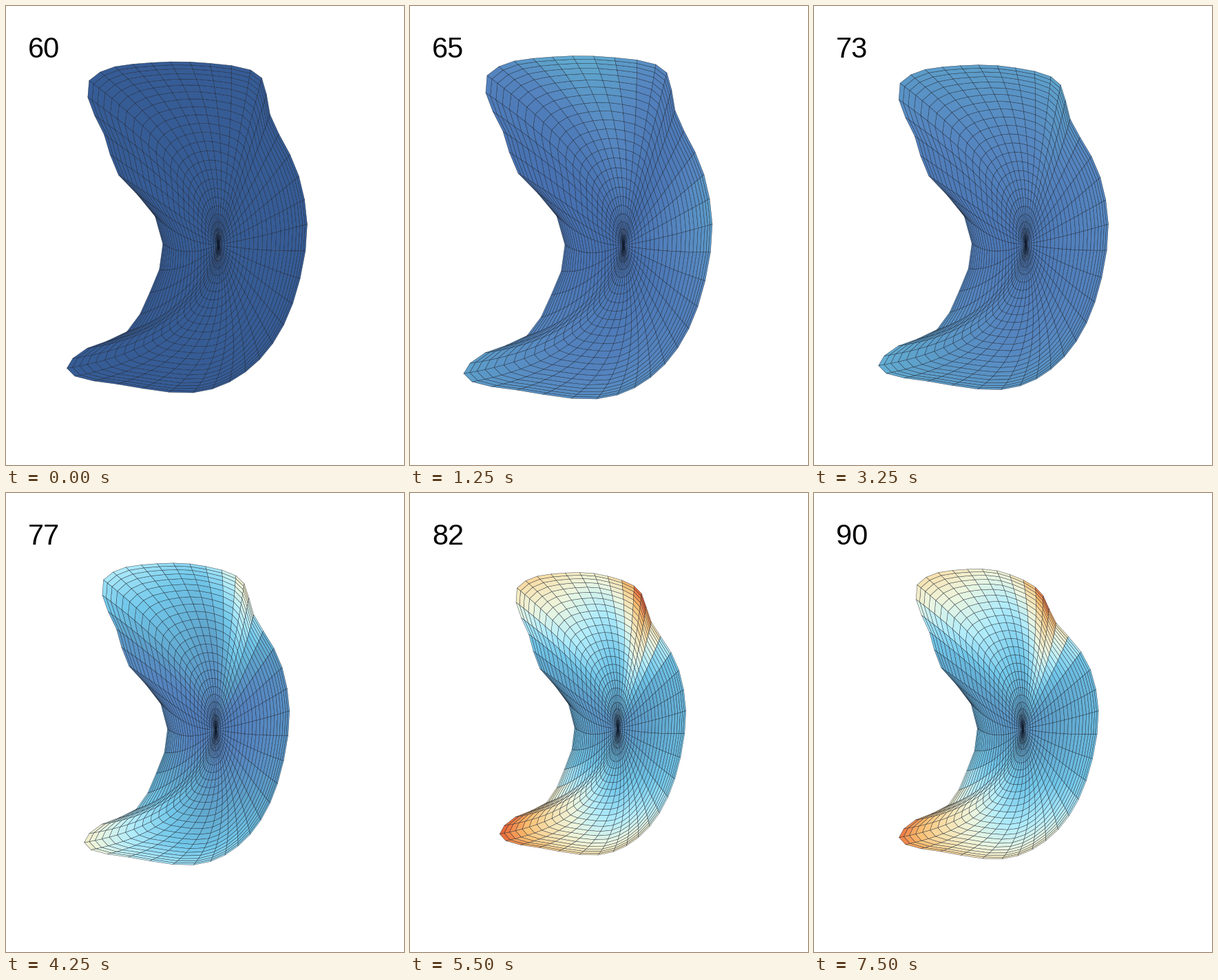
A matplotlib script for the animation above (7750 ms loop, 578 by 667 pixels).

```python
import numpy as np
import matplotlib.pyplot as plt
from matplotlib.animation import FuncAnimation
from matplotlib.collections import PolyCollection
from matplotlib.colors import LinearSegmentedColormap

W, H, DPI = 578, 667, 100
FIRST, LAST = 60, 90
RINGS, SPOKES = 25, 49

CMAP = LinearSegmentedColormap.from_list("strain", [
    "#365c96", "#4670b0", "#5585c0", "#5fa5cd", "#72c8ea", "#b0ecfb",
    "#ecf6e0", "#f7e2b0", "#fabe70", "#ee7840", "#d8432a"], N=512)


def smooth(x, xs, ys):
    """Cubic Hermite curve through the points (xs, ys), rows of ys being points."""
    xs, ys = np.asarray(xs, float), np.asarray(ys, float)
    slope = np.gradient(ys, xs, axis=0)
    x = np.atleast_1d(x)
    i = np.clip(np.searchsorted(xs, x, side="right") - 1, 0, len(xs) - 2)
    span = (xs[i + 1] - xs[i])[:, None]
    p = (x - xs[i])[:, None] / span
    ease = p * p * (3 - 2 * p)
    return (ys[i] * (1 - ease) + ys[i + 1] * ease
            + span * p * (1 - p) * ((1 - p) * slope[i] - p * slope[i + 1]))


# Relaxed outline, clockwise from the top left: spoke number, x, y.
CENTRE = np.array([310, 348])
KEYS = np.array([
    (0, 112, 101), (1, 129, 88), (4, 207, 74), (7, 297, 75), (9, 357, 85),
    (10, 373, 97), (12, 385, 152), (15, 427, 245), (17, 439, 317), (20, 418, 437),
    (24, 349, 540), (27, 271, 571), (30, 155, 558), (32, 90, 546), (33, 78, 534),
    (35, 109, 504), (37, 170, 479), (39, 205, 420), (41, 225, 347), (42, 213, 305),
    (44, 157, 243), (46, 135, 182), (48, 110, 126)])
spoke = np.arange(SPOKES)
turn = np.array([SPOKES, 0, 0])
ring = np.vstack([KEYS[-3:] - turn, KEYS, KEYS[:3] + turn])
REST = smooth(spoke, ring[:, 0], ring[:, 1:]) - CENTRE


def bump(at, width):
    """Bell curve over the spokes, wrapping around the outline."""
    gap = (spoke - at + SPOKES / 2) % SPOKES - SPOKES / 2
    return np.exp(-(gap / width) ** 2)


tip, wall, side = bump(33.2, 5.5), bump(24, 5), bump(16, 3)
left, top, right = bump(0, 4), bump(5, 3.5), bump(10, 3)
EARLY = 1.9 * tip + 1.4 * wall + 1.8 * side + 0.8 * left + 2.2 * top + 0.6 * right
LATE = 7 * tip + 4 * wall + 0.9 * side + 4.6 * left + 2.8 * top + 7 * right

# Count, overall squeeze, squeeze of the right wall, pinch of the top right
# corner, colour value at the centre, strength of the early and late patterns.
MOTION = np.array([
    (60, 0.20, 0.00, 0, 0.0, 0.0, 0.0),
    (65, 0.00, 0.00, 0, 0.9, 1.0, 0.0),
    (69, 0.08, 0.04, 3, 0.6, 1.0, 0.0),
    (73, 0.30, 0.30, 8, 1.3, 0.3, 0.2),
    (77, 0.68, 0.72, 11, 1.5, 0.0, 0.7),
    (82, 1.00, 1.00, 14, 2.3, 0.0, 1.0),
    (90, 0.87, 0.62, 24, 2.4, 0.0, 0.93)])

u = np.linspace(0, 1, RINGS + 1)
s = (0.45 * u + 0.55 * u * u * (3 - 2 * u))[:, None, None]
mid = (u[:-1] + u[1:])[:, None] / 2
theta = 2 * np.pi * (spoke - 17.5) / SPOKES
cos, sin = np.cos(theta), np.sin(theta)


def mesh(count):
    """Quads of the polar mesh and their colours."""
    squeeze, wall_in, pinch, inner, early, late = smooth(
        count, MOTION[:, 0], MOTION[:, 1:])[0]
    centre = CENTRE - squeeze * np.array([8, 6])

    x, y = REST.T
    x = x * np.where(x > 0, 1 - 0.235 * wall_in, 1 - 0.26 * squeeze)
    y = y * (1 - 0.175 * squeeze)
    rim = np.column_stack([x - pinch * right, y + 0.8 * pinch * right])

    # Spokes leave the centre on an ellipse and bend towards the outline.
    reach_x = np.where(cos > 0, 0.45 * x.max(), 0.6 * -x[41])
    reach_y = np.where(sin > 0, 0.75 * y.max(), 0.58 * -y.min())
    bend = np.column_stack([reach_x * cos, reach_y * sin])
    grid = centre + 2 * s * (1 - s) * bend + s * s * rim

    nxt = np.roll(grid, -1, axis=1)
    quads = np.stack([grid[:-1], nxt[:-1], nxt[1:], grid[1:]], axis=2)
    value = inner + (early * EARLY + late * LATE) * mid ** 1.1
    return quads.reshape(-1, 4, 2), CMAP(np.clip(value.ravel() / 10, 0, 1))


fig = plt.figure(figsize=(W / DPI, H / DPI), dpi=DPI, facecolor="white")
ax = fig.add_axes([0, 0, 1, 1])
ax.set_xlim(0, W)
ax.set_ylim(H, 0)
ax.axis("off")

shell = PolyCollection([], edgecolors=(0.05, 0.08, 0.13, 0.75), linewidths=0.35)
ax.add_collection(shell, autolim=False)
label = ax.text(32, 75, "", family="Liberation Sans", size=41.5 * 72 / DPI,
                color="black", va="baseline", ha="left")


def draw(frame):
    count = FIRST + frame
    quads, colours = mesh(count)
    shell.set_verts(quads)
    shell.set_facecolor(colours)
    label.set_text(str(count))
    return shell, label


anim = FuncAnimation(fig, draw, frames=LAST - FIRST + 1, interval=250,
                     repeat=True, repeat_delay=0)
plt.show()
```
